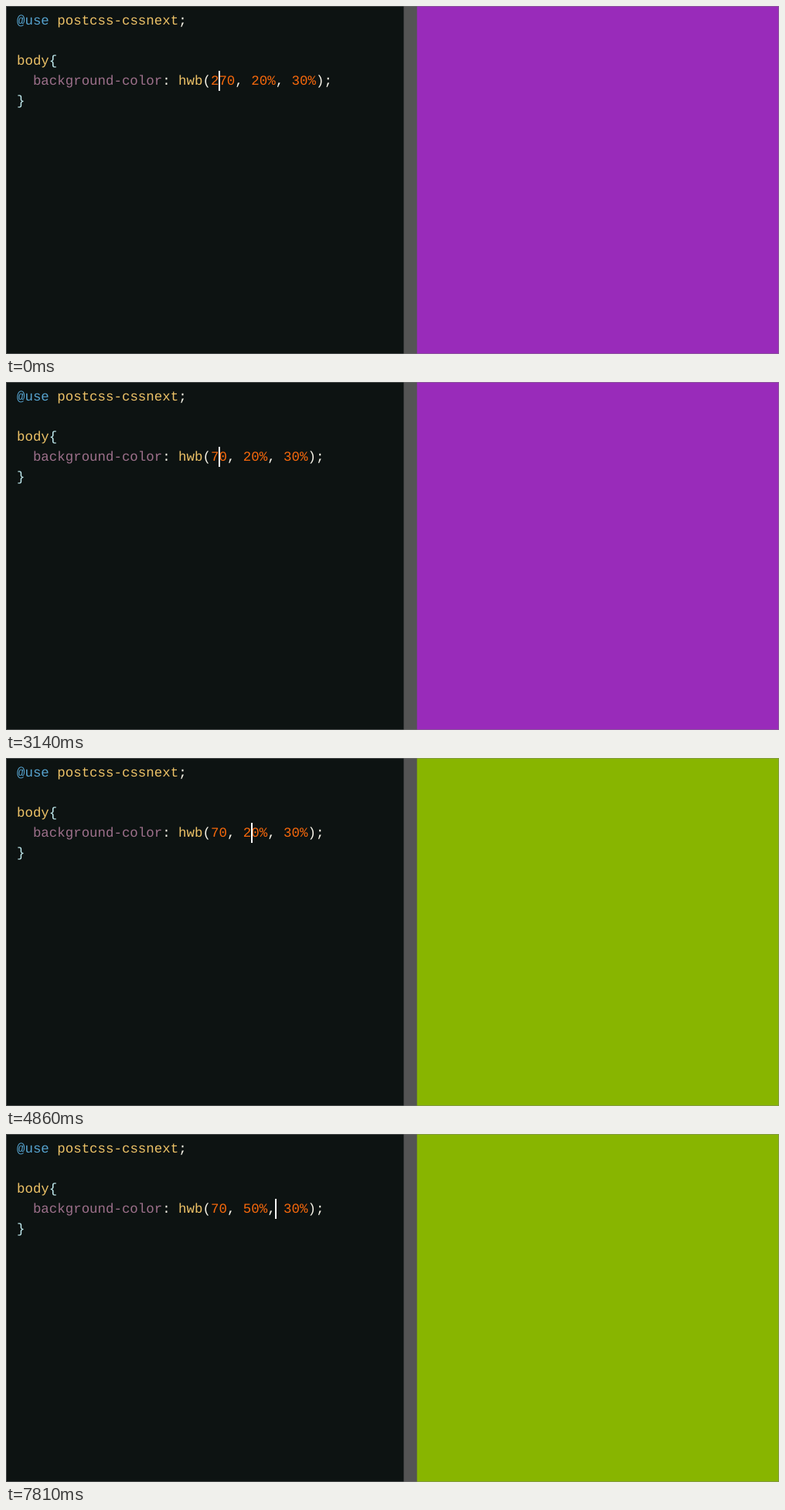
Recreate the animation shown at these times as an HTML page. Size 1000 by 451 pixels, loop 8000 ms.

```html
<!DOCTYPE html>
<html lang="en">
<head>
<meta charset="utf-8">
<title>Live color editing</title>
<style>
  html, body { margin: 0; width: 100%; height: 100%; overflow: hidden; background: #0d1312; }
  svg { display: block; width: 1000px; height: 451px; }
  text {
    font: 17.43px "Liberation Mono", "Courier New", monospace;
    white-space: pre;
    text-rendering: geometricPrecision;
    fill: #f6f3e8;
  }
  .rule { fill: #56a3cf; }
  .name { fill: #edc267; }
  .prop { fill: #9d708b; }
  .num { fill: #f8690c; }
  .brace { fill: #c3eef2; }
  .bracket { fill: none; stroke: #404545; }
</style>
</head>
<body>
<svg viewBox="0 0 1000 451">
  <rect width="1000" height="451" fill="#0d1312"/>
  <rect id="preview" x="531" width="469" height="451"/>
  <rect x="514.5" width="17.2" height="451" fill="#545454"/>
  <rect x=".5" y=".5" width="999" height="450" fill="none" stroke="#808080" stroke-opacity=".5"/>
  <rect id="selection" y="84" height="26" fill="#343a3b"/>
  <g id="brackets">
    <rect class="bracket" y="84.5" height="26"/>
    <rect class="bracket" y="84.5" height="26"/>
  </g>
  <text x="14" y="24"><tspan class="rule">@use</tspan> <tspan class="name">postcss-cssnext</tspan>;</text>
  <text x="14" y="76"><tspan class="name">body</tspan><tspan class="brace">{</tspan></text>
  <text x="14" y="102"><tspan class="prop">  background-color</tspan>: <tspan class="name">hwb</tspan>(<tspan class="num" id="hue"></tspan>, <tspan class="num" id="white"></tspan>, <tspan class="num">30%</tspan>);</text>
  <text x="14" y="128"><tspan class="brace">}</tspan></text>
  <rect id="cursor" y="84" width="2" height="26" fill="#fff"/>
</svg>
<script>
const LOOP = 8000, LEFT = 14, CHAR = 10.458;
const FIRST_BLINK = 460, BLINK = 510, RUN_STEPS = 3;

const deleteDigit = 2130, stepRight = 2870, refresh = 3320;
const select = 5410, typeDigit = 6700;

// A run walks the cursor three columns to the right within its span.
const actions = [
  { at: -100, col: 25 },
  { at: deleteDigit, col: 24 },
  { at: stepRight, col: 25 },
  { at: refresh, col: 25 },
  { at: 4120, col: 26, span: 560 },
  { at: select, col: 28 },
  { at: typeDigit, col: 29, span: 1110 }
];

const $ = id => document.getElementById(id);
const columnX = col => LEFT + col * CHAR;
const between = (t, from, to) => t >= from && t < to;
const show = (el, visible) => el.setAttribute("visibility", visible ? "visible" : "hidden");
const setText = (el, value) => { if (el.textContent !== value) el.textContent = value; };

function placeCell(el, col, offset = 0) {
  el.setAttribute("x", columnX(col) + offset);
  el.setAttribute("width", CHAR);
}

// Pauses within a run shrink in the ratio 3 : 2 : 1.
function stepsTaken(progress) {
  let steps = 0;
  while (steps < RUN_STEPS && progress >= (steps + 1) * (6 - steps) / 12) steps++;
  return steps;
}

function cursorAt(t) {
  const { at, col, span = 0 } = actions.findLast(action => action.at <= t);
  const idle = t - at - span;
  const blinks = Math.floor((idle - FIRST_BLINK) / BLINK);
  return {
    col: col + (span ? stepsTaken((t - at) / span) : 0),
    visible: idle < FIRST_BLINK || blinks % 2 === 1
  };
}

function draw(t) {
  setText($("hue"), t < deleteDigit ? "270" : "70");
  setText($("white"), t < typeDigit ? "20%" : "50%");
  $("preview").setAttribute("fill", t < refresh ? "#992bba" : "#88b500");
  show($("brackets"), between(t, deleteDigit, stepRight));
  show($("selection"), between(t, select, typeDigit));

  const { col, visible } = cursorAt(t);
  $("cursor").setAttribute("x", Math.floor(columnX(col)));
  show($("cursor"), visible);
}

function tick() {
  draw(performance.now() % LOOP);
  requestAnimationFrame(tick);
}

placeCell($("selection"), 28);
[23, 36].forEach((col, i) => placeCell($("brackets").children[i], col, -0.5));
tick();
</script>
</body>
</html>
```
